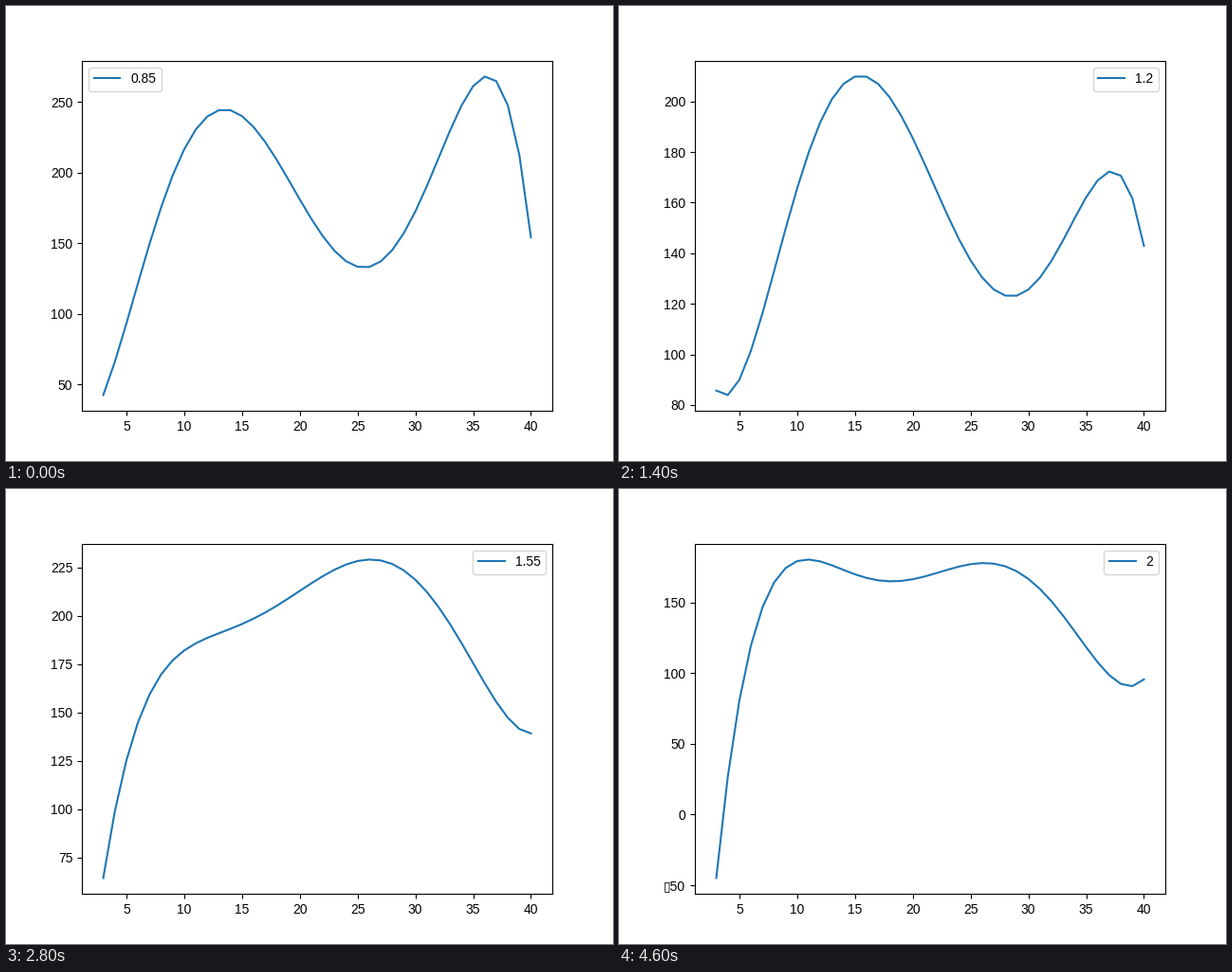
A matplotlib script that plays this animation: 640 by 480 pixels, repeating every 4.8 s.

```python
import numpy as np
import matplotlib.pyplot as plt
from matplotlib.animation import FuncAnimation
from matplotlib.ticker import FuncFormatter

plt.rcParams["font.family"] = ["Liberation Sans", "DejaVu Sans"]

FRAMES, INTERVAL = 24, 200
START, STEP = 0.85, 0.05
x = np.arange(3, 41)

# Six points fix each quintic curve; the curves in between are blends
KNOTS = [3, 7, 16, 27, 36, 40]
KEYS = {
    0: [42.4, 149.4, 232.3, 137.0, 268.0, 154.1],
    3: [35.5, 139.8, 211.3, 125.2, 215.0, 242.0],
    7: [85.7, 116.3, 209.8, 125.7, 168.8, 142.9],
    11: [85.1, 126.1, 190.5, 198.0, 152.1, 137.0],
    14: [64.5, 159.3, 198.5, 228.6, 165.2, 139.2],
    18: [44.7, 154.7, 184.8, 238.6, 117.5, 156.5],
    23: [-44.9, 146.6, 167.4, 177.5, 107.7, 95.6],
}
times = list(KEYS)


def curve(i):
    k = min(np.searchsorted(times, i, side="right"), len(times) - 1)
    t0, t1 = times[k - 1], times[k]
    ease = ((i - t0) / (t1 - t0)) ** 0.7
    a, b = np.array(KEYS[t0]), np.array(KEYS[t1])
    return np.polyval(np.polyfit(KNOTS, a + (b - a) * ease, 5), x)


def tick_text(value, _):
    # A minus sign shows as an empty box
    return f"{value:.0f}".replace("-", "\u25af")


fig, ax = plt.subplots(figsize=(6.4, 4.8), dpi=100)


def draw(i):
    ax.clear()
    value = round(START + STEP * i, 2)
    ax.plot(x, curve(i), label=str(value) if value < 2 else "2")
    ax.yaxis.set_major_formatter(FuncFormatter(tick_text))
    ax.legend()
    return ax.get_children()


anim = FuncAnimation(fig, draw, frames=FRAMES, init_func=lambda: [],
                     interval=INTERVAL, repeat=True, repeat_delay=0)
plt.show()
```
